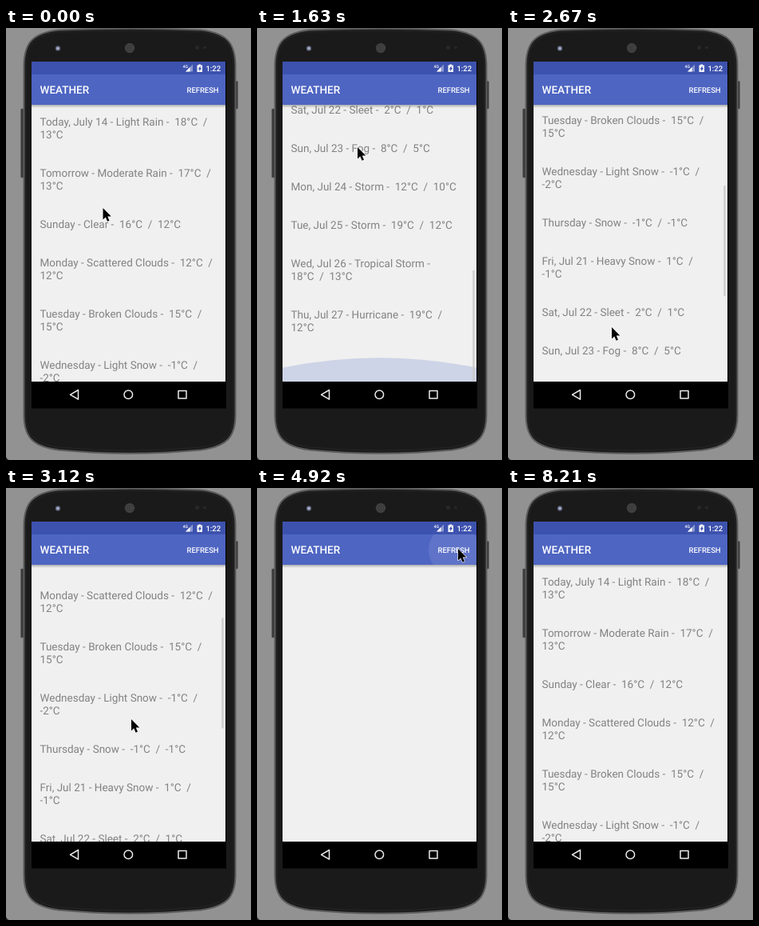
Animation, 307 px wide and 540 px high, one loop 8460 ms. Source, as an HTML page:

```html
<!DOCTYPE html>
<html lang="en">
<head>
<meta charset="utf-8">
<title>Weather list</title>
<style>
  html, body { margin: 0; width: 100%; height: 100%; overflow: hidden; background: #929292; }
  svg { display: block; width: 100vw; height: 100vh; }
  text { font-family: Roboto, "Noto Sans", sans-serif; white-space: pre; text-rendering: geometricPrecision; }
  .row { font-size: 13.5px; fill: #828282; }
  .bar { font-weight: 500; fill: #fff; }
</style>
</head>
<body>
<svg viewBox="0 0 307 540" xmlns="http://www.w3.org/2000/svg">
  <defs>
    <clipPath id="listClip"><rect x="32" y="96" width="243" height="346"/></clipPath>
    <clipPath id="barClip"><rect x="32" y="58" width="243" height="38"/></clipPath>
    <linearGradient id="shade" x2="0" y2="1">
      <stop stop-color="#000" stop-opacity=".28"/>
      <stop offset="1" stop-color="#000" stop-opacity="0"/>
    </linearGradient>
  </defs>

  <rect width="307" height="540" fill="#929292"/>
  <path d="M0 536Q1 539 4 540H0Z" fill="#222"/>

  <!-- phone -->
  <g fill="#3b3b3b" stroke="#626262" stroke-width=".6">
    <rect x="18.500" y="101" width="4" height="86" rx="1"/>
    <rect x="287" y="66.500" width="3.500" height="34.500" rx="1"/>
  </g>
  <path d="M22.500 48C22.500 19 33 6 66 2.500Q155 -1 244 2.500C277 6 287.500 19 287.500 48V484C287.500 511 277 523 244 527.500Q155 536 66 527.500C33 523 22.500 511 22.500 484Z"
        fill="#1b1b1b" stroke="#5c5c5c" stroke-width="2"/>
  <path d="M25 48C25 21 36 9 66 5Q155 1.500 244 5C274 9 285 21 285 48V484C285 508 275 519 244 524Q155 532 66 524C35 519 25 508 25 484Z"
        fill="#1a1a1a" stroke="#292929" stroke-width=".8"/>
  <circle cx="65" cy="25.500" r="3.200" fill="#555a70"/>
  <circle cx="65" cy="25.500" r="1.900" fill="#a4a9c4"/>
  <circle cx="155" cy="25" r="6.300" fill="#393939"/>
  <g fill="none" stroke="#5a5a5a" stroke-dasharray="1 1">
    <circle cx="155" cy="25" r="4.800"/>
    <circle cx="155" cy="25" r="2.300"/>
  </g>
  <circle cx="239.500" cy="24.500" r="2.500" fill="#292929"/>
  <circle cx="249" cy="24.500" r="1.800" fill="#292929"/>

  <!-- screen -->
  <rect x="32" y="42" width="244" height="433.500" fill="#000"/>
  <rect x="32" y="96" width="243" height="346" fill="#f0f0f0"/>
  <g clip-path="url(#listClip)">
    <g id="list"></g>
    <path id="glow" d="M32 424.500Q153.500 400 275 424.500V442H32Z" fill="#ced4e7"/>
    <rect id="thumb" x="270.300" width="2.200" height="138" fill="#cbcbcb"/>
    <circle id="spin" cx="153.500" cy="269.500" r="11.500" pathLength="1" fill="none" stroke="#f9588f" stroke-width="2.500"/>
  </g>

  <rect x="32" y="96" width="243" height="4" fill="url(#shade)"/>
  <rect x="32" y="58" width="243" height="38" fill="#4e65c2"/>
  <rect x="32" y="42" width="243" height="16" fill="#3d52ae"/>
  <g clip-path="url(#barClip)"><circle id="ripple" cx="247" cy="77.500" fill="#fff"/></g>
  <text class="bar" x="42.500" y="82" font-size="13.500">WEATHER</text>
  <text class="bar" x="226.500" y="81" font-size="9.450">REFRESH</text>
  <text class="bar" x="250.500" y="54" font-size="9.450">1:22</text>

  <!-- status icons -->
  <text class="bar" x="221.500" y="50" font-size="5.200">4G</text>
  <path d="M234 45.500V54.500H225Z" fill="#8c99d0"/>
  <path d="M230.500 49V54.500H225Z" fill="#fff"/>
  <path d="M241.300 45.500H244V46.500H246V55H239.500V46.500H241.300Z" fill="#fff"/>
  <path d="M243.600 47.200L240.600 51.600H242.300V54.300L245 50H243.600Z" fill="#3d52ae"/>

  <!-- navigation -->
  <g fill="none" stroke="#ececec" stroke-width="1.500" stroke-linejoin="round">
    <path d="M80.500 458.300L90.500 452.500V464.200Z"/>
    <circle cx="153.300" cy="458.300" r="5.300"/>
    <rect x="216" y="453.500" width="10" height="9.500"/>
  </g>

  <path id="cursor" d="M0 0V14.500L3.300 11.500L5.600 16.800L8 15.700L5.800 10.600H10.300Z"
        fill="#000" stroke="#fff" stroke-width="1.200" stroke-linejoin="round" paint-order="stroke"/>
</svg>

<script>
const LOOP = 8460, STEP = 149.3;
const el = id => document.getElementById(id);
const set = (id, attrs) => { for (const a in attrs) el(id).setAttribute(a, attrs[a]); };

// "|" marks a wrapped line
const rows = [
  "Today, July 14 - Light Rain -  18°C  /|13°C",
  "Tomorrow - Moderate Rain -  17°C  /|13°C",
  "Sunday - Clear -  16°C  /  12°C",
  "Monday - Scattered Clouds -  12°C  /|12°C",
  "Tuesday - Broken Clouds -  15°C  /|15°C",
  "Wednesday - Light Snow -  -1°C  /|-2°C",
  "Thursday - Snow -  -1°C  /  -1°C",
  "Fri, Jul 21 - Heavy Snow -  1°C  /|-1°C",
  "Sat, Jul 22 - Sleet -  2°C  /  1°C",
  "Sun, Jul 23 - Fog -  8°C  /  5°C",
  "Mon, Jul 24 - Storm -  12°C  /  10°C",
  "Tue, Jul 25 - Storm -  19°C  /  12°C",
  "Wed, Jul 26 - Tropical Storm -|18°C  /  13°C",
  "Thu, Jul 27 - Hurricane -  19°C  /|12°C"
];

let y = 122;
for (const row of rows) {
  for (const line of row.split("|")) {
    const text = document.createElementNS("http://www.w3.org/2000/svg", "text");
    text.setAttribute("class", "row");
    text.setAttribute("x", 42.5);
    text.setAttribute("y", y);
    text.textContent = line;
    el("list").append(text);
    y += 16;
  }
  y += 32;
}

const clamp = u => Math.min(1, Math.max(0, u));
const ease = u => { u = clamp(u); return u * u * (3 - 2 * u); };
const between = (k, a, b) => k >= a && k < b ? 1 : 0;

// Eased moves in turn, each [from step, to step, goal]
const follow = (k, value, moves) => moves.reduce(
  (v, [from, to, goal]) => v + (goal - v) * ease((k - from) / (to - from)), value);

const pointerX = k => follow(k, 121.5, [
  [0, 5, 126], [14, 17, 130], [17, 20, 158], [20, 22, 156],
  [22, 26, 228], [26, 28, 252], [48, 51, 229], [53, 55, 290]
]);
const pointerY = k => follow(k, 225, [
  [0, 5, 305], [6, 11, 149], [14, 17, 374], [17, 20, 236], [20, 22, 342],
  [22, 26, 126], [26, 28, 76], [48, 51, 423], [53, 55, 620]
]);
const scrollY = k => follow(k, 0, [[6, 11, 495], [14, 17, 242], [20.35, 22, 0]]);

// Arc that grows at its head, then shrinks at its tail, while turning
function drawSpinner(k) {
  const age = (k - 34.5) * STEP, p = (age / 1333 + 1) % 1;
  const tail = 0.75 * ease(p * 2 - 1);
  const sweep = Math.max(0.03, 0.75 * ease(p * 2) - tail);
  const turn = tail + p / 4 + age / 3332 + 0.7;
  set("spin", {
    opacity: between(k, 34, 44),
    "stroke-dasharray": `${sweep} ${1 - sweep}`,
    transform: `rotate(${turn * 360 - 90} 153.5 269.5)`
  });
}

function draw(t) {
  const k = Math.min(55, Math.floor((t + 16) / STEP));
  const scroll = scrollY(k), press = k - 30;

  set("cursor", { transform: `translate(${pointerX(k)} ${pointerY(k)})` });
  set("list", { transform: `translate(0 ${-scroll})`, opacity: 1 - between(k, 33, 44) });
  set("thumb", { y: 96 + scroll * 0.418, opacity: between(k, 7, 22) });
  set("glow", { opacity: between(k, 11, 14) * (14 - k) / 3 });
  set("ripple", {
    r: 32 * clamp(press / 3),
    opacity: between(press, 1, 5) * (0.2 - press * 0.035)
  });
  drawSpinner(k);
}

function tick() {
  draw(performance.now() % LOOP);
  requestAnimationFrame(tick);
}
tick();
</script>
</body>
</html>
```
